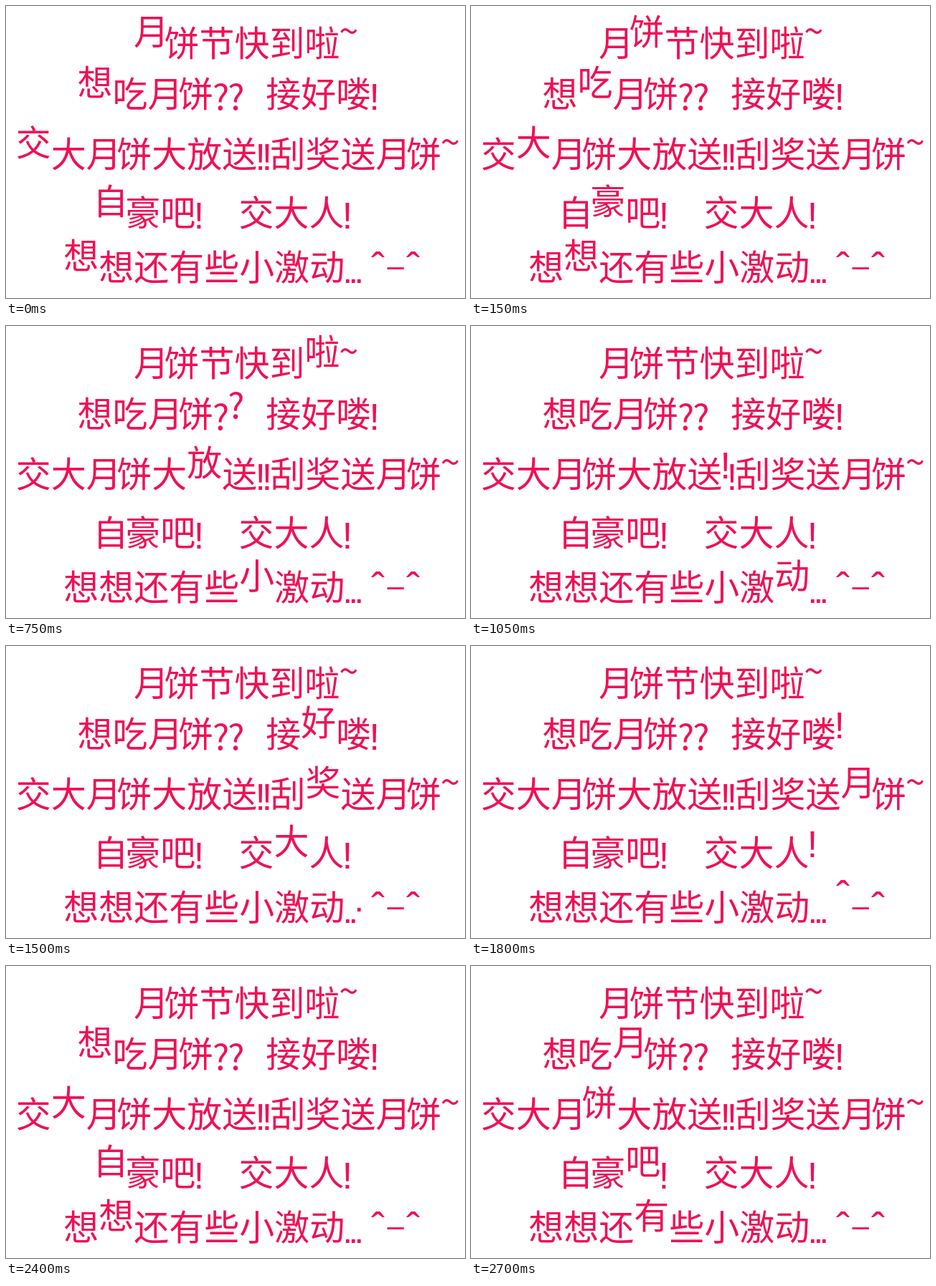
An HTML page for the animation above (2850 ms loop, 640x408 px).

```html
<!DOCTYPE html>
<html lang="zh-CN">
<head>
<meta charset="utf-8">
<title>月饼节快到啦</title>
<style>
html, body { margin: 0; width: 100%; height: 100%; overflow: hidden; background: #fff; }
svg { display: block; width: 640px; height: 408px; }
text {
  font: 49px "Noto Sans CJK SC", "Noto Sans CJK", sans-serif;
  fill: #ee1155;
  text-anchor: middle;
}
.latin { font-family: "Liberation Sans", Arial, sans-serif; }
/* One slot is 150 ms of the 2850 ms loop. */
@keyframes hop {
  0% { translate: 0 -16px; }
  5.263%, 100% { translate: 0 0; }
}
</style>
</head>
<body>
<svg id="stage" viewBox="0 0 640 408"></svg>
<script>
const SLOT = 150, SLOTS = 19, LOOP = SLOT * SLOTS, EM = 49;

// Each character, spaces included, hops for one slot; the wave restarts after `period` slots.
const lines = [
  { x: 178, y: 70, period: 19, text: "月饼节快到啦~" },
  { x: 99.5, y: 141, period: 16, text: "想吃月饼??   接好喽!" },
  { x: 13.7, y: 225, period: 15, text: "交大月饼大放送!!刮奖送月饼~" },
  { x: 121.3, y: 307, period: 16, text: "自豪吧!     交大人!" },
  { x: 80.2, y: 383, period: 15, text: "想想还有些小激动... ˆ–ˆ" }
];

// Advance, vertical shift and Latin font size where a character is not a plain em square.
const metrics = {
  "月": { width: 42.5, ink: EM },
  "自": { width: 45, ink: EM },
  " ": { width: 10.2 },
  "?": { width: 21.3, dy: 4 },
  "!": { width: 9.2, dy: 4, size: 52 },
  ".": { width: 8, dy: 4, size: 49 },
  "~": { width: 24.5, dy: -17 },
  "ˆ": { width: 24.5, dy: 2, size: 57 },
  "–": { width: 24.5, dy: -6, size: 42 }
};

const stage = document.getElementById("stage");

function make(tag, parent) {
  return parent.appendChild(document.createElementNS("http://www.w3.org/2000/svg", tag));
}

function addChar(char, x, y, size, slot, period) {
  let parent = stage;
  for (let at = slot; at < SLOTS; at += period) {
    parent = make("g", parent);
    parent.style.animation = `hop ${LOOP}ms step-end ${at * SLOT - LOOP}ms infinite`;
  }
  const el = make("text", parent);
  el.textContent = char;
  el.setAttribute("x", x);
  el.setAttribute("y", y);
  if (size) {
    el.classList.add("latin");
    el.style.fontSize = size + "px";
  }
}

for (const { x, y, period, text } of lines) {
  let left = x;
  [...text].forEach((char, slot) => {
    const { width = EM, ink = width, dy = 0, size } = metrics[char] || {};
    if (char !== " ") addChar(char, left + ink / 2, y + dy, size, slot, period);
    left += width;
  });
}
</script>
</body>
</html>
```
